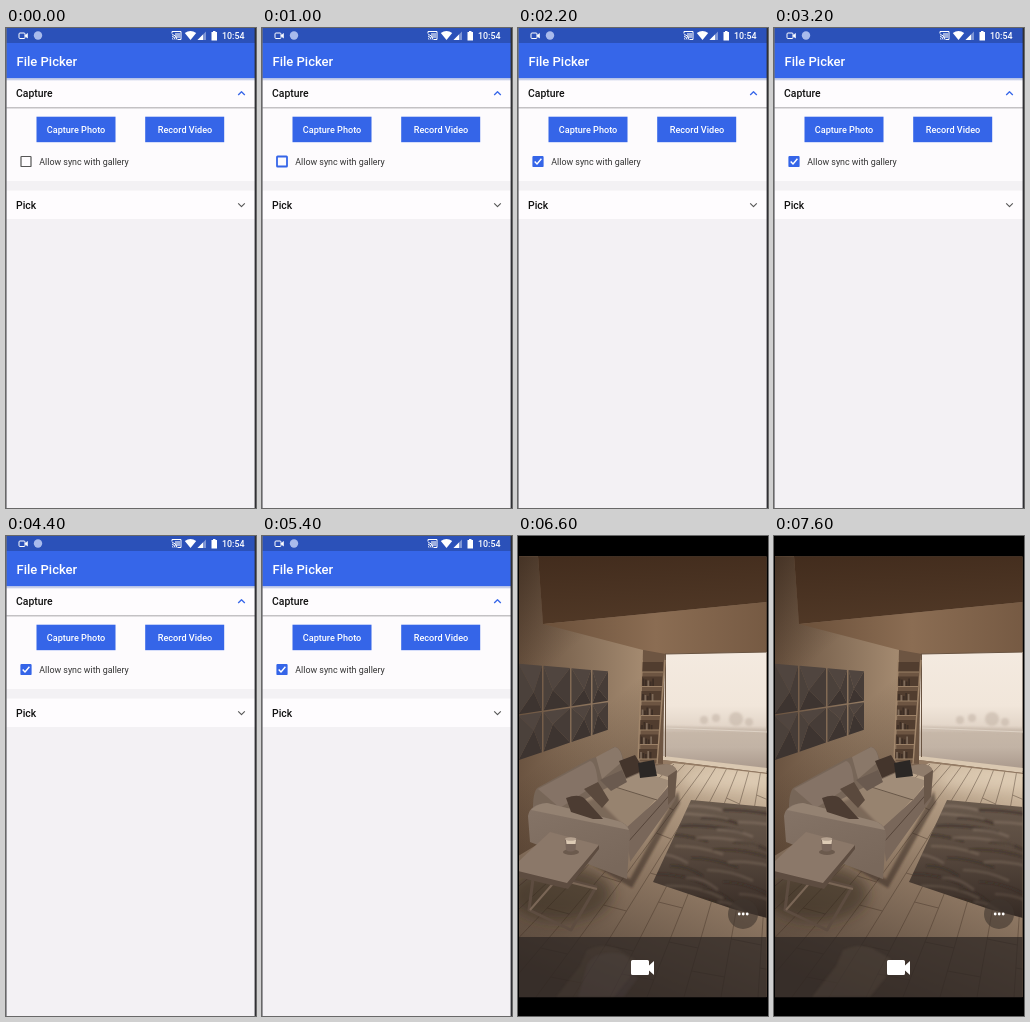
An HTML page that plays this animation: 250x480 px, repeating every 8 s.

```html
<!DOCTYPE html>
<html lang="en">
<head>
<meta charset="utf-8">
<title>File Picker</title>
<style>
  html, body { margin: 0; width: 100%; height: 100%; overflow: hidden; background: #000; }
  svg { display: block; width: 100%; height: 100%; }
  text { font-family: Roboto, sans-serif; font-weight: 500; }
  .line { fill: none; stroke-linejoin: round; }
</style>
</head>
<body>
<svg viewBox="0 0 250 480" preserveAspectRatio="none">
  <defs>
    <linearGradient id="headerShade" x2="0" y2="1"><stop stop-color="#a5b3dc"/><stop offset="1" stop-color="#fefcfe"/></linearGradient>
    <linearGradient id="cardShade" x2="0" y2="1"><stop stop-color="#b5b3b6"/><stop offset="1" stop-color="#fdfbfd"/></linearGradient>
    <linearGradient id="wall"><stop stop-color="#6a5340"/><stop offset=".6" stop-color="#8c745d"/><stop offset="1" stop-color="#a48a70"/></linearGradient>
    <linearGradient id="wallShade" x2=".35" y2="1">
      <stop stop-color="#2c1d13" stop-opacity=".6"/><stop offset=".4" stop-color="#2c1d13" stop-opacity="0"/>
      <stop offset=".65" stop-color="#2c1d13" stop-opacity="0"/><stop offset="1" stop-color="#2c1d13" stop-opacity=".4"/>
    </linearGradient>
    <linearGradient id="soffit"><stop stop-color="#6b503a"/><stop offset=".5" stop-color="#8b6d53"/><stop offset="1" stop-color="#765a43"/></linearGradient>
    <linearGradient id="beam" x2=".2" y2="1"><stop stop-color="#422c1d"/><stop offset="1" stop-color="#503826"/></linearGradient>
    <linearGradient id="window" x2="0" y2="1">
      <stop stop-color="#f4eae0"/><stop offset=".45" stop-color="#f1e6da"/>
      <stop offset=".62" stop-color="#e3d6c9"/><stop offset=".68" stop-color="#c6b7a8"/>
      <stop offset=".8" stop-color="#c2b3a5"/><stop offset="1" stop-color="#a8978a"/>
    </linearGradient>
    <linearGradient id="floor" x1=".75" y1="0" x2=".3" y2="1">
      <stop stop-color="#cfbba2"/><stop offset=".2" stop-color="#ad967e"/>
      <stop offset=".5" stop-color="#89735f"/><stop offset="1" stop-color="#544438"/>
    </linearGradient>
    <linearGradient id="rug" x2="0" y2="1">
      <stop stop-color="#695a4d"/><stop offset=".4" stop-color="#5a4b40"/><stop offset="1" stop-color="#352a24"/>
    </linearGradient>
    <linearGradient id="arm" x2=".6" y2="1"><stop stop-color="#857467"/><stop offset="1" stop-color="#79685b"/></linearGradient>
    <filter id="soft"><feGaussianBlur stdDeviation="1.2"/></filter>
    <filter id="haze" x="-50%" y="-50%" width="200%" height="200%"><feGaussianBlur stdDeviation="7"/></filter>
    <clipPath id="photo"><rect x="1" y="20.500" width="247.500" height="441"/></clipPath>
    <clipPath id="rugArea"><path d="M173 264L249 271V382L215 373L135 346Z"/></clipPath>
    <clipPath id="floorArea"><path d="M155 227L250 238V461H0V320Z"/></clipPath>
  </defs>

  <g id="picker">
    <rect width="250" height="480" fill="#f3f1f4"/>
    <rect width="250" height="15" fill="#2b51b9"/>
    <rect y="15" width="250" height="35.500" fill="#3666e9"/>
    <rect y="50.500" width="250" height="28.500" fill="#fefcfe"/>
    <rect y="50.500" width="250" height="2.500" fill="url(#headerShade)"/>
    <rect y="79" width="250" height="74" fill="#fdfbfd"/>
    <rect y="79" width="250" height="2.500" fill="url(#cardShade)"/>
    <rect y="162.500" width="250" height="28.500" fill="#fefcfe"/>

    <g class="line" stroke="#fff">
      <rect x="13" y="5" width="6" height="5.500" rx="1"/>
      <path d="M19 7.500L21.500 5.500V10L19 8Z" fill="#fff" stroke-width=".6"/>
      <path d="M166 5.500V3.500H175V11.500H171.500M166 10.500a1 1 0 0 1 1 1M166 8.500a3 3 0 0 1 3 3M166 6.700a4.800 4.800 0 0 1 4.800 4.800"/>
    </g>
    <rect x="169" y="5" width="5" height="5" fill="#fff" opacity=".55"/>
    <circle cx="32" cy="7.500" r="4.200" fill="#a9bbec"/>
    <g fill="#fff">
      <path d="M178.800 5Q184.500 .8 190.200 5L184.500 12Z"/>
      <path d="M191.500 12L200 3.500V12Z" opacity=".4"/>
      <path d="M191.500 12L197 6.500V12Z"/>
      <path d="M205.500 4H207V3H209.500V4H211V12.500H205.500Z"/>
    </g>
    <text x="216" y="11" font-size="8.900" fill="#fff">10:54</text>
    <text x="10.500" y="38" font-size="13" fill="#fff">File Picker</text>

    <g font-size="10.400" fill="#111">
      <text x="10" y="69.300">Capture</text>
      <text x="10" y="181.300">Pick</text>
    </g>
    <path class="line" d="M232.200 67L235.500 63.700L238.800 67" stroke="#3666e9" stroke-width="1.300"/>
    <path class="line" d="M232.200 175.300L235.500 178.600L238.800 175.300" stroke="#555" stroke-width="1.100"/>

    <g fill="#3565e8">
      <rect x="30.500" y="88.700" width="79" height="25.500"/>
      <rect x="139.200" y="88.700" width="79" height="25.500"/>
    </g>
    <g font-size="9.100" fill="#fff" text-anchor="middle">
      <text x="70" y="105">Capture Photo</text>
      <text x="179" y="105">Record Video</text>
    </g>
    <rect id="box" x="15" y="128.500" width="10" height="10" rx=".6"/>
    <path id="tick" class="line" d="M16.700 133.500L19 136L23.400 130.800" stroke="#fff" stroke-width="1.400"/>
    <text x="33.300" y="137" font-size="8.900" fill="#333" style="font-weight:400">Allow sync with gallery</text>
    <path d="M.4 0V480" stroke="#77777c" stroke-width=".8"/>
    <path d="M249.300 0V480" stroke="#303034" stroke-width="1.400"/>
  </g>

  <g id="camera">
    <rect width="250" height="480"/>
    <g clip-path="url(#photo)">
      <rect y="20" width="250" height="441" fill="#7c6552"/>
      <path id="side" d="M0 20H20L25 87L125 113V240L0 330Z" fill="url(#wall)"/>
      <use href="#side" style="mix-blend-mode:normal"/>
      <path d="M0 20H20L25 87L125 113V240L0 330Z" fill="url(#wallShade)"/>
      <path d="M20 20H250V66L25 88Z" fill="url(#beam)"/>
      <path d="M25 88L250 66V117L147 119L125 114Z" fill="url(#soffit)"/>
      <path d="M125 114L148 118L145 228L122 225Z" fill="#6d5542"/>

      <path d="M147 118L250 116V235L145 222Z" fill="url(#window)"/>
      <g fill="#c5b6a8" opacity=".6" filter="url(#soft)">
        <path d="M148 190L250 193V197L148 194Z"/>
        <circle cx="186" cy="184" r="4"/><circle cx="198" cy="182" r="4"/>
        <circle cx="218" cy="183" r="7"/><circle cx="231" cy="186" r="4"/>
      </g>
      <path d="M147 192L250 196" stroke="#ded2c5"/>
      <path d="M145 220L250 232V237L145 224Z" fill="#dac8b1"/>
      <path d="M145 224L250 237V241L145 228Z" fill="#947b64"/>
      <path d="M147.500 118V221M147 118L250 116" class="line" stroke="#695442"/>

      <g id="shelf"/>
      <path d="M155 227L250 238V461H0V320Z" fill="url(#floor)"/>
      <g clip-path="url(#floorArea)">
        <ellipse cx="215" cy="243" rx="55" ry="12" fill="#ecdcc5" opacity=".5" filter="url(#haze)"/>
        <g id="planks" class="line" stroke="#3f2f24" stroke-width=".8" opacity=".5"/>
      </g>
      <ellipse cx="42" cy="358" rx="52" ry="28" fill="#2c2019" opacity=".5" filter="url(#haze)"/>
      <path d="M173 264L249 271V382L215 373L135 346Z" fill="url(#rug)"/>
      <g id="streaks" clip-path="url(#rugArea)" filter="url(#soft)"/>
      <g id="panels"/>

      <!-- sofa -->
      <path d="M60 320L112 343L160 255L162 267L114 352Z" fill="#2f221a" opacity=".5" filter="url(#soft)"/>
      <path d="M15 272Q15 253 21 251L70 224Q76 221 80 221L96 211Q102 210 105 222L128 244L55 285Z" fill="#776658"/>
      <path d="M20 253L72 225Q78 226 80 247L42 272Z" fill="#857366"/>
      <path d="M78 221L97 211Q103 212 105 225L84 243Z" fill="#8a7869"/>
      <path d="M45 275L98 247L138 263L110 294Z" fill="#97836f"/>
      <path d="M92 250L124 236L153 245L139 264Z" fill="#a18d79"/>
      <path d="M45 275L78 262L106 290Z" fill="#6a594c" opacity=".6" filter="url(#soft)"/>
      <path d="M94 250L139 264" class="line" stroke="#695849"/>
      <path d="M108 292L139 264L154 246L158 262L112 326Z" fill="#79675a"/>
      <path d="M110 306L156 254" stroke="#56453a"/>
      <path d="M122 232L148 228Q158 229 159 235L157 261L150 268V241Z" fill="#8f7c6b"/>
      <path d="M150 240L159 234L157 261L150 269Z" fill="#695749"/>
      <path d="M10 280Q12 268 29 267L100 285Q112 288 112 300L109 343L12 306Z" fill="url(#arm)"/>
      <path d="M13 274Q18 268 29 267L100 285Q108 287 111 294Z" fill="#948272"/>
      <path d="M48 262Q61 257 67 263L85 283L75 283L53 276Z" fill="#4c3c32"/>
      <path d="M66 253L80 246L91 264L84 272Z" fill="#5a493d"/>
      <path d="M82 244L104 234L109 246L93 255Z" fill="#6a5a4f"/>
      <path d="M101 225L117 219L126 234L108 242Z" fill="#44352c"/>
      <path d="M120 227L136 224L139 240L122 242Z" fill="#2b2725"/>

      <!-- table -->
      <g class="line" stroke-width="3">
        <path d="M15 343L11 374L53 394L78 351L50 344" stroke="#5d4c40"/>
        <path d="M12 374L39 343L79 353" stroke="#7a6656" stroke-width="2"/>
      </g>
      <path d="M0 326L32 296L81 309L50 349L0 336Z" fill="#8b7869"/>
      <path d="M0 335L49 347L81 309V313L50 353L0 341Z" fill="#5d4c40"/>
      <ellipse cx="53" cy="316" rx="8" ry="3" fill="#4d3d32" opacity=".5"/>
      <path d="M47 303H58.500L57.500 314Q52 317 48 314Z" fill="#77655a"/>
      <path d="M48 304H58L57.500 308H48.500Z" fill="#ddcbb5"/>
      <ellipse cx="52.700" cy="303" rx="5.700" ry="1.800" fill="#b5a290"/>

      <rect y="401" width="250" height="61" fill="#2d2623" opacity=".72"/>
      <path id="cool" d="M60 461L68 432Q72 419 88 417Q106 415 112 424L120 442L106 461Z" fill="#756b7b" filter="url(#soft)"/>
      <path id="warm" d="M38 461L62 430L69 414Q84 407 98 412L117 423L112 441L96 461Z" fill="#6b5b4e" filter="url(#soft)"/>
    </g>
    <circle cx="225" cy="378" r="15" fill="#40362f" opacity=".6"/>
    <g fill="#fff">
      <circle cx="221.200" cy="378" r="1.400"/><circle cx="225.200" cy="378" r="1.400"/><circle cx="229.200" cy="378" r="1.400"/>
      <path d="M114.500 424H129.500Q131 424 131 425.500V429.500L136 425V439L131 434.500V437.500Q131 439 129.500 439H114.500Q113 439 113 437.500V425.500Q113 424 114.500 424Z"/>
    </g>
  </g>
</svg>
<script>
const LOOP = 8000;
const $ = id => document.getElementById(id);
const mix = (a, b, k) => a + (b - a) * k;
const path = (d, attrs = '') => `<path d="${d}" ${attrs}/>`;

function buildPanels() {
  const xs = [0, 25, 53, 74, 91];
  const rows = [x => 127 + x * .085, x => 179 - x * .15, x => 225 - x * .34];
  let out = '';
  for (let r = 0; r < 2; r++) for (let c = 0; c < 4; c++) {
    const left = xs[c] + .5, right = xs[c + 1] - 1;
    const corners = [[left, rows[r](left) + .7], [right, rows[r](right) + .7],
                     [right, rows[r + 1](right) - .7], [left, rows[r + 1](left) - .7]];
    const tip = [mix(left, right, c % 2 ? .35 : .65), mix(corners[0][1], corners[2][1], r ? .4 : .6)];
    ['#50453f', '#463c37', '#3d3430', '#4b413b'].forEach((fill, i) => {
      out += path(`M${corners[i]}L${corners[(i + 1) % 4]}L${tip}Z`, `fill="${fill}"`);
    });
  }
  return out;
}

function buildShelf() {
  let out = '';
  for (let i = 0; i < 7; i++) {
    const y = 136 + i * 14.5, left = 124 - i * .5, right = 145 - i * .9;
    out += path(`M${left} ${y - 10}H${right}V${y}H${left}Z`, 'fill="#513d2f"');
    if (i > 0) for (let b = 0; b < 5; b++) {
      const height = 5 + (b * 7 + i * 3) % 4;
      out += path(`M${left + 2 + b * 2.4} ${y}v-${height}`, `stroke="${(b + i) % 3 ? '#3d2e25' : '#7d6a5a'}" stroke-width="1.7"`);
    }
    out += path(`M${left} ${y}H${right}`, 'stroke="#9c8167" stroke-width="1.2"');
  }
  return out + path('M124 124L120 226M147 124L139 228', 'stroke="#a1866b" stroke-width="1.4"');
}

function buildPlanks() {
  let out = '';
  const seamX = (i, y) => mix(145 + i * 11, -130 + i * 37, (y - 228) / 233);
  for (let i = 0; i < 17; i++) {
    out += path(`M${seamX(i, 228)} 228L${seamX(i, 461)} 461`);
    for (let j = 0; j < 3; j++) {
      const y = 242 + j * 72 + (i * 29) % 61;
      out += path(`M${seamX(i, y)} ${y}L${seamX(i + 1, y + 6)} ${y + 6}`);
    }
  }
  return out;
}

function buildStreaks() {
  let out = '';
  for (let i = 0; i < 26; i++) {
    const x = 130 + (i * 37) % 95, y = 266 + i * 4, length = 25 + (i * 13) % 40;
    out += path(`M${x} ${y}q${length / 2} ${i % 3 - 2} ${length} ${4 + i * .4}`,
      `fill="none" stroke="${i % 2 ? '#8f7d6d' : '#2b211b'}" stroke-width="2.2" opacity="${mix(.65, .25, i / 26)}"`);
  }
  return out;
}

$('panels').innerHTML = buildPanels();
$('shelf').innerHTML = buildShelf();
$('planks').innerHTML = buildPlanks();
$('streaks').innerHTML = buildStreaks();

function setAttrs(node, attrs) {
  for (const key in attrs) node.setAttribute(key, attrs[key]);
}

function draw(t) {
  const filming = t >= 5800, focused = t >= 1000, checked = t >= 1400;
  $('picker').style.display = filming ? 'none' : '';
  $('camera').style.display = filming ? '' : 'none';
  setAttrs($('box'), {
    fill: checked ? '#3565e8' : '#fdfbfd',
    stroke: focused ? '#3565e8' : '#555',
    'stroke-width': focused && !checked ? 1.8 : 1.2
  });
  $('tick').style.display = checked ? '' : 'none';

  // The reflection settles in three steps after the camera opens.
  const settled = [6200, 6600, 6800].filter(time => t >= time).length / 3;
  $('cool').setAttribute('opacity', .28 * (1 - settled));
  $('warm').setAttribute('opacity', .22 * settled);
}

const start = performance.now();
function tick() {
  draw((performance.now() - start) % LOOP);
  requestAnimationFrame(tick);
}
tick();
</script>
</body>
</html>
```
